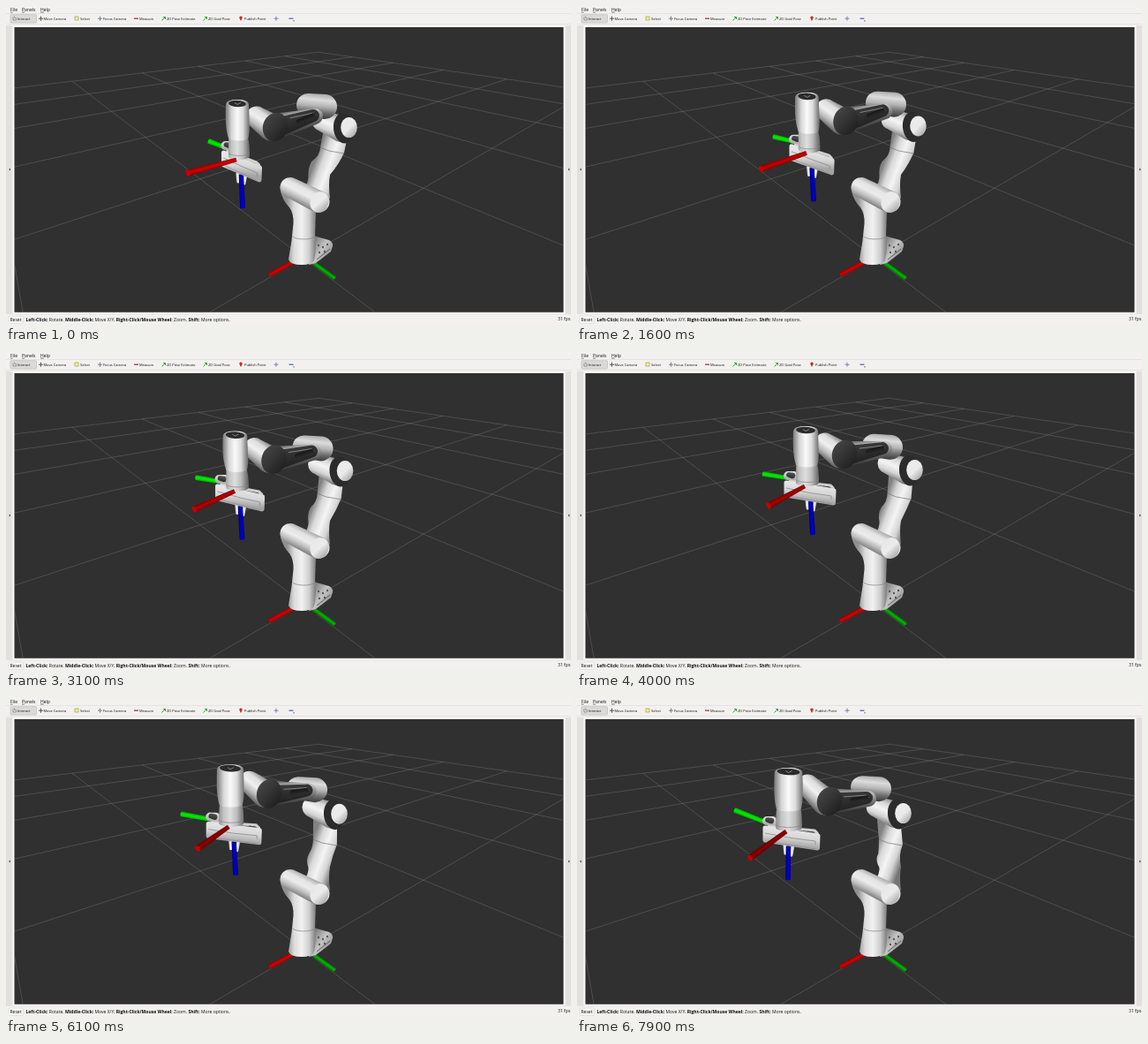
Recreate the animation shown at these times as an HTML page with a canvas. Size 640 by 360 pixels, loop 8000 ms.

```html
<!DOCTYPE html>
<html lang="en">
<head>
<meta charset="utf-8">
<title>Robot arm viewer</title>
<style>
html, body { margin: 0; width: 640px; height: 360px; overflow: hidden; background: #f2f1f0; }
canvas, svg { position: absolute; left: 0; top: 0; }
text { font: 5.05px "Open Sans", "Noto Sans", sans-serif; fill: #111; white-space: pre; }
.tool { font-size: 4px; }
.key { text-decoration: underline; }
.b { font-weight: 700; }
</style>
</head>
<body>
<canvas id="view" width="640" height="360"></canvas>
<svg width="640" height="360" viewBox="0 0 640 360">
  <path d="M0 8.5H640" stroke="#e6e4e2"/>
  <path d="M0 20.5H640M0 348.5H640" stroke="#dddbd9" stroke-width=".6"/>
  <rect x="5" y="9.7" width="29.5" height="9.3" rx="1" fill="#dcdad7" stroke="#b8b5b1" stroke-width=".6"/>
  <text x="5" y="5.8"><tspan class="key">F</tspan>ile</text>
  <text x="18" y="5.8"><tspan class="key">P</tspan>anels</text>
  <text x="39" y="5.8"><tspan class="key">H</tspan>elp</text>
  <g id="tools"></g>
  <g fill="none" stroke-width="1">
    <path d="M8 12.5v3.5h3.5v-2.5l-2-.3v-1.7" stroke="#888" stroke-width=".8"/>
    <path d="M37 14.2h5M39.5 11.7v5" stroke="#555"/>
    <rect x="78" y="12" width="4" height="4" fill="#f2ee9c" stroke="#a5a04a" stroke-width=".7"/>
    <path d="M104 14.2h5M106.500 11.7v5" stroke="#6c7f93"/>
    <path d="M145 14.2h5" stroke="#a8564c" stroke-width="1.5"/>
    <path d="M176.5 16.5l4-4M178 12.5h2.5v2.5" stroke="#3aa33a"/>
    <path d="M223.5 16.5l4-4M225 12.5h2.5v2.5" stroke="#3aa33a"/>
    <path d="M266 17l-1.5-3a1.7 1.7 0 1 1 3 0z" fill="#cc2b22"/>
    <path d="M303.5 14.2h5M306 11.7v5" stroke="#6f86b8"/>
    <path d="M320.5 14.2h5" stroke="#5577b8" stroke-width="1.4"/>
  </g>
  <path d="M325 16.5h2l-1 1.2z" fill="#444"/>
  <path d="M5 183.5v3l-2-1.5zM637 183.5v3l2-1.5z" fill="#555"/>
  <rect x="3" y="351" width="16.5" height="8.5" rx="1" fill="#f6f5f4" stroke="#d4d1ce" stroke-width=".5"/>
  <text x="4.5" y="357">Reset</text>
  <text x="22.5" y="357"><tspan class="b">Left-Click:</tspan> Rotate. <tspan class="b">Middle-Click:</tspan> Move X/Y. <tspan class="b">Right-Click/Mouse Wheel:</tspan> Zoom. <tspan class="b">Shift:</tspan> More options.</text>
  <text x="625" y="356">31 fps</text>
</svg>
<script>
const g = document.getElementById('view').getContext('2d');

const tools = [['Interact', 13], ['Move Camera', 42.5], ['Select', 84], ['Focus Camera', 110],
  ['Measure', 151], ['2D Pose Estimate', 182], ['2D Goal Pose', 229], ['Publish Point', 270]];
document.getElementById('tools').innerHTML = tools.map(([name, x]) =>
  `<text class="tool" x="${x}" y="15.6">${name}</text>`).join('');

// time | cap | flange | red tip | green tip | gripper half-width | elbow | wrist joint | forearm end | blue lean, hand radius
const poses = [
  [0,    262, 111, 264, 171, 206, 189, 230, 153, 20.5, 8.5, 388, 138,   303, 137, 348, 124, 4, 13],
  [900,  261, 106, 263, 167, 207, 187, 226, 150, 22, 8.5,   387, 137,   303, 133, 347, 121, 5, 13],
  [2200, 260, 100, 263, 160, 210, 182, 220, 146, 24, 7.5,   385, 136,   302, 127, 346, 116, 5, 13.5],
  [4000, 259, 89,  261, 149, 217, 174, 211, 138, 27, 4.5,   382, 134,   301, 116, 346, 109, 6, 14],
  [5200, 258.5, 82, 260, 143, 222, 169, 206, 134, 28.5, 3,  379.5, 132.5, 300, 108, 344, 104, 7, 14.5],
  [7000, 248, 80,  249, 144, 209, 174, 190, 129, 29.5, 4.5, 374, 131,   291, 111, 336, 107, 2, 15.5],
  [7900, 239.5, 84, 240, 148, 196, 181, 179, 127, 30, 4.5,  369, 131,   284, 117, 328, 113, -1, 15.8]];

// Cubic Hermite through the poses with finite-difference tangents
function poseAt(t) {
  const last = poses.length - 1;
  let k = 0;
  while (k < last - 1 && t >= poses[k + 1][0]) k++;
  const a = poses[k], b = poses[k + 1], d = b[0] - a[0], s = (t - a[0]) / d;
  const slope = (n, i) => {
    const p = poses[Math.max(n - 1, 0)], q = poses[Math.min(n + 1, last)];
    return (q[i] - p[i]) / (q[0] - p[0]) * d;
  };
  return a.map((v, i) => {
    const diff = b[i] - v, m = slope(k, i), n = slope(k + 1, i);
    return v + s * m + s * s * (3 * diff - 2 * m - n) + s * s * s * (m + n - 2 * diff);
  });
}

const WHITE = ['#828282', '#d8d8d8', '#f4f4f4', '#d4d4d4', '#757575'];
const LOBE = ['#a8a8a8', '#dcdcdc', '#b4b4b4', '#6c6c6c', '#3c3c3c'];
const DARK = ['#3c3c3c', '#333', '#2a2a2a', '#202020'];
const GREEN = ['#00b000', '#00f000', '#00a800'];
const BLUE = ['#000078', '#0000d0', '#000078'];

const add = (p, x, y) => [p[0] + x, p[1] + y];
const reds = v => [.65, 1, .65].map(k => `rgb(${v * k},0,0)`);

function blend(x0, y0, x1, y1, colors) {
  const grad = g.createLinearGradient(x0, y0, x1, y1);
  colors.forEach((c, i) => grad.addColorStop(i / (colors.length - 1), c));
  return grad;
}

// Tapered capsule shaded across its axis
function limb([ax, ay], ra, [bx, by], rb, colors) {
  const th = Math.atan2(by - ay, bx - ax), h = Math.PI / 2, r = Math.max(ra, rb);
  const nx = -Math.sin(th) * r, ny = Math.cos(th) * r, mx = (ax + bx) / 2, my = (ay + by) / 2;
  g.beginPath();
  g.arc(ax, ay, ra, th + h, th - h);
  g.arc(bx, by, rb, th - h, th + h);
  g.closePath();
  g.fillStyle = blend(mx - nx, my - ny, mx + nx, my + ny, colors);
  g.fill();
}

function rod(a, ra, b, rb, colors) {
  const th = Math.atan2(b[1] - a[1], b[0] - a[0]);
  const nx = -Math.sin(th), ny = Math.cos(th);
  g.beginPath();
  g.moveTo(a[0] - nx * ra, a[1] - ny * ra);
  g.lineTo(b[0] - nx * rb, b[1] - ny * rb);
  g.ellipse(b[0], b[1], rb * .4, rb, th, -Math.PI / 2, Math.PI / 2);
  g.lineTo(a[0] + nx * ra, a[1] + ny * ra);
  g.closePath();
  g.fillStyle = blend(b[0] - nx * rb, b[1] - ny * rb, b[0] + nx * rb, b[1] + ny * rb, colors);
  g.fill();
}

function disc([x, y], rx, ry, fill, tilt = 0) {
  g.beginPath();
  g.ellipse(x, y, rx, ry, tilt, 0, 7);
  g.fillStyle = fill;
  g.fill();
}

function seam([x, y], rx, ry) {
  g.beginPath();
  g.ellipse(x, y, rx, ry, 0, .1, Math.PI - .1);
  g.lineWidth = .7;
  g.strokeStyle = '#858585';
  g.stroke();
}

function shape(d, fill) {
  g.fillStyle = fill;
  g.fill(new Path2D(d));
}

function line(points, width, color) {
  g.beginPath();
  points.forEach(p => g.lineTo(...p));
  g.lineWidth = width;
  g.strokeStyle = color;
  g.stroke();
}

// Ground grid, 10 x 10 cells seen through a pinhole camera
const grid = new Path2D();
function gridLine(place) {
  let pen = false;
  for (let v = -5; v <= 5.01; v += .05) {
    const [x, y] = place(v);
    const side = .0655 - .766 * x + .643 * y, ahead = 1.215 - .643 * x - .766 * y;
    const depth = .899 * ahead + .453, drop = .9296 - .438 * ahead;
    if (depth < .15) { pen = false; continue; }
    const px = 320.5 + 389 * side / depth, py = 185 + 389 * drop / depth;
    pen ? grid.lineTo(px, py) : grid.moveTo(px, py);
    pen = true;
  }
}
for (let i = -5; i <= 5; i++) {
  gridLine(v => [v, i]);
  gridLine(v => [i, v]);
}

function drawBase() {
  rod([327, 289], 2.3, [299, 304], 2.8, reds(215));
  rod([346, 289], 2.1, [372, 308], 2.4, ['#007800', '#00b800', '#007000']);
  shape('M348 260L366 265Q371 268 370 272L368 278L351 291L343 293Z', blend(346, 270, 368, 284, ['#808080', '#c4c4c4', '#8e8e8e']));
  line([[352, 287], [367, 275]], 1, '#606060');
  [[354, 271], [359, 273], [364, 270], [355, 279], [361, 278]].forEach(p => disc(p, 1.1, 1.2, '#555'));
  shape('M311 210Q314 221 321 228Q326 235 325.5 246Q324 266 320 287Q322 293 335 293Q346 293 349 288Q352 274 350 262L351 232L345 214Z',
    blend(318, 0, 352, 0, ['#909090', '#dcdcdc', '#f2f2f2', '#cecece', '#707070']));
  seam([337.5, 260], 13, 4);
}

function drawArm(elbow, wrist, end, cap) {
  const [kx, ky] = elbow, tx = 370 + (kx - 388) * .74, ty = 162, shin = 340 + (tx - 358) * .35;
  shape(`M338 206Q343 198 342.5 192Q${shin - 2} 183 ${shin + 2} 176Q${tx - 14} 169 ${tx - 14} ${ty - 2}` +
    `L${kx - 29} ${ky + 6}L${kx - 2} ${ky + 14}L${tx + 13} ${ty + 4}Q${tx + 8} 178 367 191Q365 202 367 218Z`,
    blend(tx - 19, 172, tx + 13, 184, WHITE));
  line([[tx - 14, ty - 2], [tx - 4, ty + 2], [tx + 13, ty + 5]], .7, '#777');
  limb([322, 205.5], 11.5, [354, 221.5], 12.5, ['#a8a8a8', '#e4e4e4', '#ececec', '#bdbdbd', '#7c7c7c']);
  disc([355, 222], 10.5, 12, blend(346, 212, 364, 232, ['#e6e6e6', '#ececec', '#a0a0a0']), .3);

  limb(add(elbow, -30, -8), 11.5, add(elbow, -8, 1), 15, WHITE);
  const lobeY = 112 + (ky - 138) * 1.55;
  limb([kx - 46, lobeY], 13, [kx - 27, lobeY + 2], 14, LOBE);
  disc(add(elbow, -5.5, .5), 11.5, 17, '#2b2b2b', -.12);
  disc(add(elbow, .5, -.5), 9.3, 11.5, blend(kx - 8, ky - 8, kx + 9, ky + 9, ['#ececec', '#eaeaea', '#a2a2a2']));

  limb(wrist, 15, add(end, 2, 1), 9, ['#4a4a4a', '#c4c4c4', '#909090', '#585858', '#303030']);
  limb(add(wrist, 0, 2), 11.5, end, 7, DARK);
  const mid = [wrist[0] * .45 + end[0] * .55, wrist[1] * .45 + end[1] * .55];
  line([add(mid, -6, -3), add(end, 0, -3), add(end, 3, 0)], 1, '#858585');
  limb(add(mid, 4, 1), 2.8, end, 2.6, ['#161616', '#2c2c2c']);

  limb(add(cap, 22, 15), 12.5, add(wrist, -3, 0), 15.5, ['#787878', '#dedede', '#f0f0f0', '#b8b8b8', '#5c5c5c']);
  disc(add(wrist, 2, 0), 14, 16.5, blend(wrist[0] - 14, wrist[1] - 12, wrist[0] + 12, wrist[1] + 12, ['#484848', '#363636', '#202020']), .3);
}

function drawHand(cap, flange, red, green, [ux, uy], lean, r) {
  const mid = add(flange, 3, 3.5);
  const tl = add(mid, -ux, -uy), tr = add(mid, ux, uy), br = add(tr, -.5, 14), bl = add(tl, 0, 14);
  rod(add(tl, 4, -5), 2.4, green, 2.9, GREEN);

  // camera bracket and rear rail
  limb(add(tl, 2, -8), 5, add(tl, 8, -7), 6, ['#e2e2e2', '#c8c8c8', '#9a9a9a']);
  limb(add(tl, 3, -9), 2.8, add(tl, 7, -8), 3.3, ['#555', '#2c2c2c']);
  line([add(tl, 3, -2), add(tr, -4, -6), add(tr, -1, -3), add(tr, 0, 4)], 3.2, '#cfcfcf');
  line([add(tr, -12, -5), add(tr, -4, -3), add(tr, -3, 3)], 1.2, '#444');

  const root = add(flange, lean * .6, 22);
  limb(add(root, -4, -3), 2.3, add(root, -3.5, 6), 1.6, WHITE);
  limb(add(root, 5, -3), 2.3, add(root, 3.5, 8), 1.6, WHITE);
  rod(add(root, 0, -2), 2.6, add(flange, lean, 57), 3, BLUE);

  const body = blend(mid[0], mid[1] - 3, mid[0] - 2, mid[1] + 16, ['#e6e6e6', '#d6d6d6', '#a4a4a4']);
  line([tl, tr, br, bl, tl, tr], 5, body);
  g.fillStyle = body;
  g.fill();
  line([add(tl, 0, 6), add(mid, 0, 7), add(tr, -3, 6), add(tr, -3, 10)], .8, '#8b8b8b');
  line([add(bl, 2, 1), add(br, -2, 1)], .7, '#8c8c8c');

  // wrist cylinder: a waisted upper shell above a plain collar
  const [cx, cy] = cap, [fx, fy] = flange, q = r - 1, h = fy - cy;
  const sx = cx + (fx - cx) * .66, sy = cy + h * .66, w = r - 2;
  const tone = c => blend(cx - r, 0, cx + r, 0, c);
  shape(`M${sx - w} ${sy}Q${fx - q} ${sy + 5} ${fx - q} ${fy - 1}A${q} 4 0 0 0 ${fx + q} ${fy - 1}Q${fx + q} ${sy + 5} ${sx + w} ${sy}Z`,
    tone(['#7c7c7c', '#c4c4c4', '#dedede', '#bcbcbc', '#6e6e6e']));
  shape(`M${cx - r} ${cy}Q${cx - r + 1} ${cy - 5} ${cx} ${cy - 5}Q${cx + r - 1} ${cy - 5} ${cx + r} ${cy}` +
    `C${cx + r + 1} ${cy + h * .45} ${sx + r} ${sy - 8} ${sx + w} ${sy}A${r} 4 0 0 1 ${sx - w} ${sy}` +
    `C${sx - r} ${sy - 8} ${cx - r - 1} ${cy + h * .45} ${cx - r} ${cy}Z`,
    tone(['#7c7c7c', '#d6d6d6', '#fafafa', '#dcdcdc', '#787878']));
  disc(add(cap, 0, -.5), r - 3, 3.8, '#2b2b2b', .05);
  line([add(cap, -3, -1.5), add(cap, 0, .5), add(cap, 4, -1.5)], .8, '#9a9a9a');
  seam([fx, fy - 5], q, 3.5);

  // the red axis dims as it swings toward the viewer
  const steep = (red[1] - fy) / (fx - red[0]);
  rod(add(flange, -3, 3), 2.4, red, 3.6, reds(255 - 150 * steep));
  disc(red, 2.2, 3.6, '#c80000', Math.atan2(red[1] - fy, red[0] - fx));
}

function draw(now) {
  const t = Math.floor(now % 8000 / 100) * 100;
  const p = poseAt(Math.min(t, 7900)), at = i => [p[i], p[i + 1]];
  g.clearRect(0, 0, 640, 360);
  g.fillStyle = '#e2e0de';
  g.fillRect(0, 22, 640, 326);
  g.fillStyle = '#fafafa';
  g.fillRect(7.5, 22, 626, 327);
  g.save();
  g.beginPath();
  g.rect(9.5, 24, 622, 322.7);
  g.clip();
  g.fillStyle = '#303030';
  g.fillRect(9, 23, 623, 325);
  g.lineJoin = 'round';
  g.lineWidth = .7;
  g.strokeStyle = 'rgba(160,160,160,.38)';
  g.stroke(grid);
  drawBase();
  drawArm(at(11), at(13), at(15), at(1));
  drawHand(at(1), at(3), at(5), at(7), at(9), p[17], p[18]);
  g.restore();
  requestAnimationFrame(draw);
}
requestAnimationFrame(draw);
</script>
</body>
</html>
```
